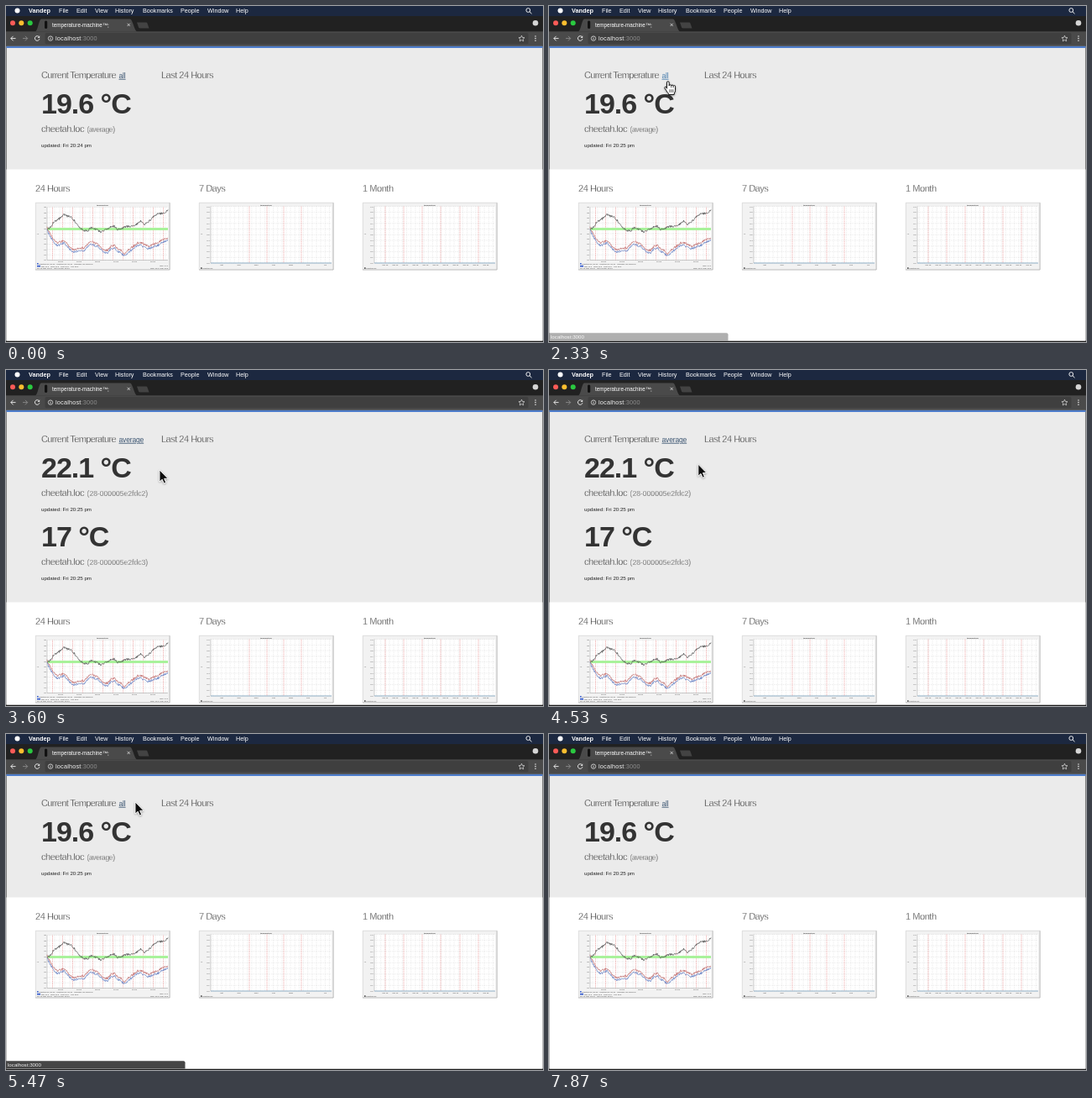
Recreate the animation shown at these times as an HTML page. Size 640 by 400 pixels, loop 8 s.

```html
<!DOCTYPE html>
<html lang="en">
<head>
<meta charset="utf-8">
<title>temperature-machine</title>
<style>
html, body { margin: 0; width: 100%; height: 100%; overflow: hidden; background: #1c1c1c; }
svg { display: block; width: 100vw; height: 100vh; }
text { font-family: "Liberation Sans", Arial, sans-serif; white-space: pre; }
.thin { font-size: 11px; fill: #333; stroke-width: .3; }
.small { font-size: 8.5px; }
.big { font-size: 34px; font-weight: 700; fill: #333; letter-spacing: -1px; }
.grey { stroke: #ebebeb; }
.white { stroke: #fff; }
.link { font-size: 8.5px; letter-spacing: -.15px; text-decoration: underline; }
</style>
</head>
<body>
<svg id="stage" viewBox="0 0 640 400" preserveAspectRatio="none"></svg>
<script>
const LOOP = 8000, STEP = 1000 / 15, SHIFT = 82;

const text = (x, y, s, attrs = '') => `<text x="${x}" y="${y}" ${attrs}>${s}</text>`;
const rect = (x, y, w, h, fill, attrs = '') =>
  `<rect x="${x}" y="${y}" width="${w}" height="${h}" fill="${fill}" ${attrs}/>`;
const circle = (x, y, r, fill, attrs = '') => `<circle cx="${x}" cy="${y}" r="${r}" fill="${fill}" ${attrs}/>`;
const path = (d, attrs) => `<path d="${d}" ${attrs}/>`;
const thin = (x, y, s, spacing, cls = 'grey') =>
  text(x, y, s, `class="thin ${cls}" letter-spacing="${spacing}"`);
const tiny = (x, y, s, attrs = '') => text(x, y, s, `font-size="2.4" fill="#444" ${attrs}`);
const range = (n, f) => Array.from({ length: n }, (_, i) => f(i)).join('');

function random(seed) {
  return () => (seed = (seed * 16807) % 2147483647) / 2147483647;
}

// Browser window
function menuBar() {
  const items = [['File', 63], ['Edit', 84], ['View', 106], ['History', 130], ['Bookmarks', 163],
    ['People', 208], ['Window', 240], ['Help', 274]];
  return rect(0, 0, 640, 12, '#1c2840') + circle(13.5, 5.6, 3, '#fff') +
    text(27, 8.2, 'Vandep', 'font-size="7.3" font-weight="700" fill="#fff"') +
    items.map(([s, x]) => text(x, 8.2, s, 'font-size="7.2" fill="#fff"')).join('') +
    circle(622.3, 5, 2.4, 'none', 'stroke="#fff" stroke-width=".9"') +
    path('M624.1 6.8l2.4 2.4', 'stroke="#fff" stroke-width="1"');
}

function tabStrip() {
  const lights = [['#fc5b57', 8], ['#fdbe2f', 18.3], ['#2ac940', 28.7]];
  return rect(0, 12, 640, 18.5, '#212121') +
    lights.map(([c, x]) => circle(x, 20.3, 3, c)).join('') +
    path('M35 30.5c3-1 4-14.5 7-15H148c3 .5 5 14 8 15z', 'fill="#4a4a4a"') +
    path('M156 19.5h11q1 0 1.5 1.3l2 5.7h-10.5q-1.5 0-2-1.3z', 'fill="#434343"') +
    rect(46, 17.5, 3.2, 9.5, '#111', 'rx="1.6"') +
    text(55, 24.5, 'temperature-machine™', 'font-size="6.3" fill="#fff"') +
    circle(121.8, 22, .6, '#ddd') + circle(121.8, 25, .6, '#ddd') +
    path('M144.6 20.8l3.2 3.2m0-3.2l-3.2 3.2', 'stroke="#ddd" stroke-width=".8"') +
    circle(631, 20.3, 3.3, '#d5d5d5');
}

function toolBar() {
  const line = c => `fill="none" stroke="${c}" stroke-width="1"`;
  return rect(0, 30.3, 640, 17.5, '#4a4a4a') +
    rect(46.5, 32, 576, 13.2, '#3f3f3f', 'rx="1.5"') +
    path('M11.5 38.6H5.8M8.6 35.8L5.8 38.6L8.6 41.4', line('#e2e2e2')) +
    path('M20 38.6h5.7M22.9 35.8l2.8 2.8l-2.8 2.8', line('#858585')) +
    path('M39.4 36.8A2.8 2.8 0 1 0 39.9 39.2', line('#e2e2e2')) +
    path('M40.2 35.2v2.7h-2.7z', 'fill="#e2e2e2"') +
    circle(53, 38.6, 2.7, 'none', 'stroke="#ddd" stroke-width=".8"') +
    path('M53 38v2.2M53 36.7v.7', 'stroke="#ddd" stroke-width=".8"') +
    text(59, 41.2, 'localhost<tspan fill="#8e8e8e">:3000</tspan>',
      'font-size="7.3" letter-spacing=".2" fill="#f0f0f0"') +
    path('M614.5 35.2l1 2.3 2.5.2-1.9 1.7.6 2.5-2.2-1.3-2.2 1.3.6-2.5-1.9-1.7 2.5-.2z',
      'fill="none" stroke="#e2e2e2" stroke-width=".7"') +
    [36, 38.6, 41.2].map(y => circle(631, y, .8, '#e2e2e2')).join('');
}

// Page content
function reading(y, value, sensor, spacing) {
  return text(42, y, value, 'class="big"') +
    thin(42, y + 21.5, 'cheetah.loc', -.48) +
    thin(96.5, y + 21.5, `(${sensor})`, spacing, 'small grey') +
    text(42, y + 40, 'updated: Fri 20:25 pm', 'class="stamp" font-size="6.13" fill="#222"');
}

function frame(x, [px, py, w, h]) {
  return rect(x, 234, 160.3, 80, '#f2f2f2') +
    path(`M${x + .3} 314V234.3h160`, 'fill="none" stroke="#d4d4d4" stroke-width=".7"') +
    path(`M${x} 314h160.1V234.3`, 'fill="none" stroke="#a9a9a9" stroke-width=".8"') +
    rect(px, py, w, h, '#fff') +
    tiny(x + 80, 238, 'temperature', 'font-weight="700" text-anchor="middle"') +
    tiny(x + 2.8, 272, '°C', 'text-anchor="middle"');
}

function grid([x, y, w, h], cols, rows, reds) {
  const v = range(cols, i => `M${(x + (i + .5) * w / cols).toFixed(1)} ${y}v${h}`);
  const hz = range(rows + 1, i => `M${x} ${(y + i * h / rows).toFixed(1)}h${w}`);
  const r = reds.map(rx => `M${rx} ${y}v${h}`).join('');
  return path(v + hz, 'stroke="#bbb" stroke-width=".35" stroke-dasharray=".7 .9" fill="none"') +
    path(r, 'stroke="#e26d6d" stroke-width=".5" stroke-dasharray="1 .6" fill="none"') +
    path(`M${x} ${y}v${h}h${w}`, 'stroke="#8a8a8a" stroke-width=".4" fill="none"');
}

// Joins points 4px apart with a jittery line
function trace(ys, seed, colour, dy = 0) {
  const rnd = random(seed);
  const d = range((ys.length - 1) * 8 + 1, k => {
    const i = Math.min(k >> 3, ys.length - 2), f = k / 8 - i;
    const y = ys[i] + (ys[i + 1] - ys[i]) * f + dy + (rnd() - .5) * 2.6;
    return `${k ? 'L' : 'M'}${(49 + k / 2).toFixed(1)} ${y.toFixed(1)}`;
  });
  return path(d, `fill="none" stroke="${colour}" stroke-width=".65" stroke-linejoin="round"`);
}

function dayChart() {
  const plot = [49, 239.5, 144, 63];
  const warm = [267, 263, 257, 255, 252, 248.5, 250, 251, 255, 260, 265, 267, 268, 264, 265, 267, 269, 267,
    265, 263, 262, 266, 266, 263, 262, 263, 261, 259, 256, 260, 257, 254, 250, 247, 247, 246, 243];
  const cool = [264, 272, 278, 282, 281, 279, 283, 288, 290, 289, 288, 288, 284, 280, 282, 283, 287, 290,
    291, 286, 285, 289, 291, 295, 291, 288, 285, 282, 282, 284, 286, 285, 283, 282, 279, 277, 276];
  const reds = Array.from({ length: 12 }, (_, i) => 55.5 + i * 12);
  return frame(35, plot) + grid(plot, 24, 10, reds) +
    rect(49, 264, 144, 3, '#a9f29b') +
    trace(warm, 77, '#4a4a4a') + trace(cool, 311, '#b85b5b') + trace(cool, 907, '#5573bd', 3) +
    range(11, i => tiny(47.8, 240.3 + i * 6.3, 30 - i * 2, 'text-anchor="end"')) +
    range(6, i => tiny(65 + i * 22, 305, `${String(i * 4).padStart(2, '0')}:00`, 'text-anchor="middle"')) +
    rect(37, 306, 1.6, 1.6, '#3a5fcd') + rect(37, 308.8, 4, 1.8, '#3a5fcd') +
    tiny(39.3, 308, 'cheetah.loc 28-00   cheetah.loc 28-01   average (all sensors)') +
    tiny(42, 310.7, 'Min 14.2   Max 23.9   Last 19.6   Avg 18.8') +
    tiny(37, 313, 'Fri 12 May 20:24   Sat 13 May 20:24') +
    tiny(193, 310.3, 'Min: 14.2', 'text-anchor="end"') +
    tiny(193, 312.7, 'Max: 23.9 Avg: 18.8', 'text-anchor="end"');
}

function emptyChart(x, reds, labels, step) {
  const plot = [x + 14, 238.5, 144, 67.5];
  return frame(x, plot) + grid(plot, 28, 10, reds) +
    path(`M${x + 14} 306h144`, 'stroke="#7db4d8" stroke-width=".6"') +
    range(11, i => tiny(x + 12.5, 239.5 + i * 6.7, (1 - i / 10).toFixed(1), 'text-anchor="end"')) +
    range(labels.length, i => tiny(x + 27 + i * step, 308.6, labels[i], 'text-anchor="middle"')) +
    rect(x + 2, 311.3, 1.6, 1.6, '#444') + tiny(x + 4.3, 313, 'cheetah.loc');
}

function charts() {
  const days = ['Sat', 'Sun', 'Mon', 'Tue', 'Wed', 'Thu', 'Fri'];
  const weeks = Array.from({ length: 11 }, (_, i) => `Wk ${15 + i}`);
  return rect(0, 194.5, 640, 290, '#fff') +
    thin(35, 221, '24 Hours', -.45, 'white') +
    thin(230, 221, '7 Days', -.5, 'white') +
    thin(425, 221, '1 Month', -.45, 'white') +
    dayChart() +
    emptyChart(230, [290, 311, 331, 352], days, 20.6) +
    emptyChart(425, [452, 474, 496, 518, 541, 563], weeks, 12);
}

const arrow = path('M0 0V14L3.2 11.2L5.3 16L7.6 15L5.6 10.3H10Z',
  'fill="#0a0a0a" stroke="#fff" stroke-width=".9" stroke-linejoin="round"');
const hand = path('M-.4 10.5V3.4a1.3 1.3 0 0 1 2.7 0V7.2a1.2 1.2 0 0 1 2.5 .2a1.2 1.2 0 0 1 2.5 .4' +
    'a1.2 1.2 0 0 1 2.4 .7V12.5q0 2-1.4 3.8V17.8H1.7V16.6Q-.2 14.8-1.3 12.5L-3 10a1.2 1.2 0 0 1 1.9-1.3z',
  'fill="#fff" stroke="#111" stroke-width="1" stroke-linejoin="round"') +
  path('M3 11.5v3.6M5 11.5v3.6M7 11.5v3.6M4.8 7.5v2M7.3 8v1.7', 'stroke="#111" stroke-width=".7"');

document.getElementById('stage').innerHTML =
  `<defs><clipPath id="page">${rect(.5, 47, 639, 351.5, '#000')}</clipPath>
   <filter id="shade" x="-50%" y="-50%" width="200%" height="200%">
   <feDropShadow dx="0" dy=".8" stdDeviation=".8" flood-opacity=".4"/></filter></defs>` +
  rect(0, 0, 640, 400, '#1c1c1c') +
  '<g clip-path="url(#page)">' + rect(0, 47, 640, 352, '#ebebeb') + rect(0, 47.5, 640, 2.5, '#4d7ccb') +
  thin(42, 85.5, 'Current Temperature', -.65) + text(134.5, 85.8, '', 'id="link" class="link"') +
  thin(185, 85.5, 'Last 24 Hours', -.5) +
  `<g id="average">${reading(128, '19.6 °C', 'average', -.35)}</g>` +
  `<g id="sensors">${reading(128, '22.1 °C', '28-000005e2fdc2', .05)}` +
  `${reading(128 + SHIFT, '17 °C', '28-000005e2fdc3', .05)}</g>` +
  `<g id="charts">${charts()}</g></g>` +
  menuBar() + tabStrip() + toolBar() +
  '<g id="status">' + path('M0 389.3H211.5q2 0 2 2V398.5H0z', 'fill="#464646"') +
  text(2, 395.8, 'localhost:3000', 'font-size="6.2" fill="#f2f2f2"') + '</g>' +
  `<g id="cursor" filter="url(#shade)"><g id="arrow">${arrow}</g><g id="hand">${hand}</g></g>`;

const ui = Object.fromEntries(['link', 'average', 'sensors', 'charts', 'status', 'cursor', 'arrow', 'hand']
  .map(id => [id, document.getElementById(id)]));
const stamp = ui.average.querySelector('.stamp');

// Pointer stops: time, x, y
const stops = [
  [667, 226, 192], [1200, 162, 93], [1600, 142, 90], [2100, 142, 90], [2500, 139, 84],
  [3070, 139, 84], [3600, 183, 119], [4270, 183, 119], [5000, 154, 81],
  [5670, 154, 81], [6200, 226, 161], [6400, 226, 161], [6733, 231, 178]
];
const ramp = (t, a, b) => Math.min(1, Math.max(0, (t - a) / (b - a)));
const ease = p => p * p * (3 - 2 * p);
const within = (t, a, b) => t >= a && t < b;
const show = (node, on) => node.setAttribute('display', on ? 'inline' : 'none');

function pointer(t) {
  let [, x, y] = stops[0];
  for (let i = 1; i < stops.length; i++) {
    const [t0, x0, y0] = stops[i - 1], [t1, x1, y1] = stops[i];
    if (t < t0) break;
    const p = ease(ramp(t, t0, t1));
    x = x0 + (x1 - x0) * p;
    y = y0 + (y1 - y0) * p;
  }
  return [x, y];
}

function render(t) {
  const detail = within(t, 2790, 5460);
  const onLink = within(t, 2130, 3190) || within(t, 4790, 5460);
  const [x, y] = pointer(t);

  show(ui.average, !detail);
  show(ui.sensors, detail);
  ui.charts.setAttribute('transform', `translate(0 ${detail ? SHIFT : 0})`);
  stamp.textContent = `updated: Fri 20:${t < 990 ? 24 : 25} pm`;

  ui.link.textContent = detail ? 'average' : 'all';
  ui.link.setAttribute('fill', onLink ? '#4a7fae' : within(t, 1860, 2130) ? '#46607c' : '#3d5672');

  const status = ramp(t, 2130, 2450) - ramp(t, 3190, 3530) + ramp(t, 4660, 4980) - ramp(t, 5730, 6070);
  ui.status.setAttribute('opacity', status.toFixed(3));

  ui.cursor.setAttribute('opacity', t >= 60 && t < 7860 ? ramp(t, 10, 540) : 0);
  ui.cursor.setAttribute('transform', `translate(${x.toFixed(2)} ${y.toFixed(2)})`);
  show(ui.arrow, !onLink);
  show(ui.hand, onLink);
}

const start = performance.now();
function tick() {
  const t = (performance.now() - start) % LOOP;
  render(Math.floor(t / STEP) * STEP);
  requestAnimationFrame(tick);
}
tick();
</script>
</body>
</html>
```
